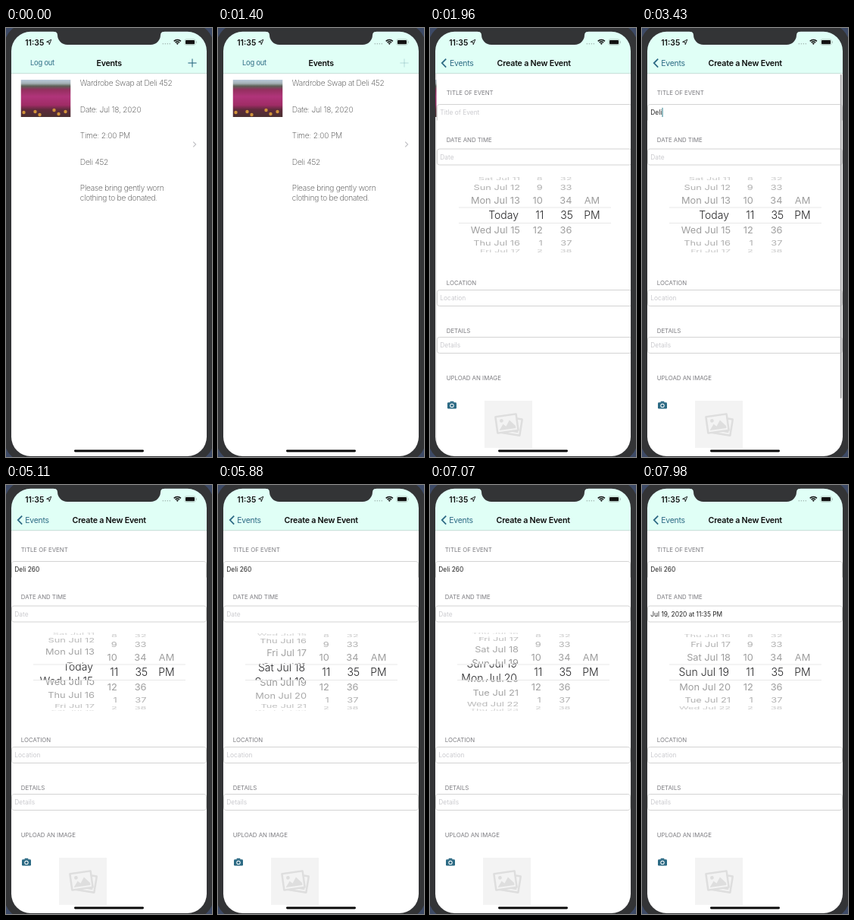
Recreate the animation shown at these times as an HTML page with a canvas. Size 272 by 564 pixels, loop 8 s.

```html
<!DOCTYPE html>
<html lang="en">
<head>
<meta charset="utf-8">
<title>Event planner</title>
<style>
html, body { margin: 0; width: 100%; height: 100%; overflow: hidden; background: #333436; }
canvas { display: block; width: 100vw; height: 100vh; }
</style>
</head>
<body>
<canvas id="stage"></canvas>
<script>
const W = 272, H = 564, LOOP = 8000;
const SCREEN = { x: 7, y: 4.7, w: 258, h: 558.2, r: 25.5 };
const NOTCH = { left: 68, right: 204, bottom: 22, r: 13, flare: 5 };
const MINT = '#e0fff6', TINT = '#2c6a84';
const PUSH_START = 1580;
const TITLE = 'Deli 260';
const KEY_TIMES = [2940, 3150, 3360, 3430, 3570, 3710, 3850, 4200];

const canvas = document.getElementById('stage');
const ctx = canvas.getContext('2d');

const clamp = v => Math.max(0, Math.min(1, v));
const span = (t, a, b) => clamp((t - a) / (b - a));
const linear = u => u;
const easeOut = u => 1 - (1 - u) ** 2;
const easeInOut = u => u * u * (3 - 2 * u);

// Day wheel: time, day of July, easing towards that day
const WHEEL = [
  [5040, 14, linear], [5180, 14.5, easeOut], [5460, 14.5, linear],
  [5880, 18.3, linear], [6440, 20.4, easeOut], [6800, 20.4, linear],
  [7070, 19.59, linear], [7350, 19.2, easeOut], [7500, 19.2, linear],
  [7840, 19, easeInOut]
];

function dayAt(t) {
  let [t0, d0] = WHEEL[0];
  for (const [t1, d1, ease] of WHEEL) {
    if (t < t1) return d0 + (d1 - d0) * ease(span(t, t0, t1));
    [t0, d0] = [t1, d1];
  }
  return d0;
}

// Critically damped spring, 0 to 1
function pushAt(t) {
  const w = 18.26 * Math.max(0, t - PUSH_START) / 1000;
  return 1 - Math.exp(-w) * (1 + w);
}

function group(draw, alpha = 1, dx = 0, dy = 0) {
  ctx.save();
  ctx.globalAlpha *= alpha;
  ctx.translate(dx, dy);
  draw();
  ctx.restore();
}

function rect(x, y, w, h, color) {
  ctx.fillStyle = color;
  ctx.fillRect(x, y, w, h);
}

function rounded(x, y, w, h, r, color) {
  ctx.fillStyle = color;
  ctx.beginPath();
  ctx.roundRect(x, y, w, h, r);
  ctx.fill();
}

function dot(x, y, r, color) {
  ctx.fillStyle = color;
  ctx.beginPath();
  ctx.arc(x, y, r, 0, Math.PI * 2);
  ctx.fill();
}

function path(points, close) {
  ctx.beginPath();
  points.forEach(([x, y]) => ctx.lineTo(x, y));
  if (close) ctx.closePath();
}

function line(points, color, width) {
  path(points);
  ctx.strokeStyle = color;
  ctx.lineWidth = width;
  ctx.stroke();
}

function shape(points, color) {
  path(points, true);
  ctx.fillStyle = color;
  ctx.fill();
}

// y is the middle of the capitals
function text(str, x, y, size, color, { weight = 400, align = 'left', track = 0 } = {}) {
  ctx.font = `${weight} ${size}px Inter, "Liberation Sans", sans-serif`;
  ctx.letterSpacing = `${track * size}px`;
  ctx.textAlign = align;
  ctx.fillStyle = color;
  ctx.fillText(str, x, y + size * 0.364);
}

function photo() {
  ctx.beginPath();
  ctx.rect(0, 0, 66, 49);
  ctx.clip();
  const tones = ctx.createLinearGradient(0, 0, 0, 49);
  [[0, '#b9c9da'], [0.1, '#a3b0b4'], [0.17, '#5d6157'], [0.27, '#94305f'],
    [0.45, '#b0347a'], [0.68, '#a02c66'], [0.8, '#5f2a3c'], [1, '#4a3030']]
    .forEach(([at, color]) => tones.addColorStop(at, color));
  rect(0, 0, 66, 49, tones);
  [[4, 43], [19, 42], [25, 46], [44, 40], [50, 45], [59, 42]]
    .forEach(([x, y]) => dot(x, y, 2.2, '#d0923a'));
}

function eventsPage() {
  rect(7, 60, 258, 504, '#fff');
  group(photo, 1, 19.5, 68);
  const rows = [
    ['Wardrobe Swap at Deli 452', 72.5], ['Date: Jul 18, 2020', 107],
    ['Time: 2:00 PM', 141.5], ['Deli 452', 176],
    ['Please bring gently worn', 210.5], ['clothing to be donated.', 223]
  ];
  rows.forEach(([s, y]) => text(s, 97.8, y, 10.2, '#3c3c3c', { weight: 200, track: -0.02 }));
  line([[247.2, 149.6], [250.6, 153], [247.2, 156.4]], '#c2c2c6', 1.2);
}

function field(y, value, hint, open) {
  const r = 3, x0 = 7.5, x1 = 264.5, y1 = y + 21;
  ctx.strokeStyle = '#cfcfcf';
  ctx.lineWidth = 0.9;
  ctx.beginPath();
  if (open) {
    ctx.moveTo(x0, y1);
    ctx.arcTo(x0, y, x1, y, r);
    ctx.arcTo(x1, y, x1, y1, r);
    ctx.lineTo(x1, y1);
  } else {
    ctx.roundRect(x0, y, x1 - x0, 21, r);
  }
  ctx.stroke();
  text(value || hint, 11.3, y + 10.5, 8.4, value ? '#222' : '#cbcbcf');
}

const DAYS = ['Sun', 'Mon', 'Tue', 'Wed', 'Thu', 'Fri', 'Sat'];
const dayName = d => d === 14 ? 'Today' : `${DAYS[(d + 2) % 7]} Jul ${d}`;
const hourName = h => String((h + 11) % 12 + 1);
const noonName = n => ['AM', 'PM'][n] || '';

const PICK_Y = 246, PICK_R = 51.5, PICK_STEP = Math.PI / 8;

function curvedRow(label, offset, x, align) {
  const angle = offset * PICK_STEP, squash = Math.cos(angle);
  if (squash < 0.05) return;
  ctx.save();
  ctx.translate(x, PICK_Y + PICK_R * Math.sin(angle));
  ctx.scale(1, squash);
  ctx.globalAlpha *= 0.25 + 0.75 * squash;
  text(label, 0, 0, 12.8, '#979797', { align });
  ctx.restore();
}

function flatRow(label, offset, x, align) {
  text(label, x, PICK_Y + offset * 19, 14, '#262628', { weight: 350, align });
}

// Each column: position, label, edge of curved rows, edge of flat rows, alignment
function wheels(day, drawRow, flat) {
  const columns = [
    [day, dayName, 117, 115, 'right'], [11, hourName, 146.8, 148.3, 'right'],
    [35, String, 185.5, 187, 'right'], [1, noonName, 212, 212, 'center']
  ];
  for (const [pos, label, curvedX, flatX, align] of columns) {
    const mid = Math.round(pos);
    for (let i = mid - 4; i <= mid + 4; i++) {
      drawRow(label(i), i - pos, flat ? flatX : curvedX, align);
    }
  }
}

function clipped(bands, draw) {
  group(() => {
    ctx.beginPath();
    bands.forEach(([y0, y1]) => ctx.rect(30, y0, 214, y1 - y0));
    ctx.clip();
    draw();
  });
}

function picker(day) {
  const top = 235, bottom = 257;
  clipped([[194, top], [bottom, 297]], () => wheels(day, curvedRow, false));
  clipped([[top, bottom]], () => wheels(day, flatRow, true));
  [236, 256.5].forEach(y => line([[36, y], [237, y]], '#dedede', 0.7));
}

function camera() {
  rounded(21, 492.2, 12, 8.4, 1.4, TINT);
  shape([[24, 492.6], [25, 490.8], [29, 490.8], [30, 492.6]], TINT);
  dot(27, 496.4, 2.7, '#fff');
  dot(27, 496.4, 1.7, TINT);
}

function frameIcon(angle, dx, dy) {
  ctx.save();
  ctx.translate(101.5 + dx, 521 + dy);
  ctx.rotate(angle);
  rounded(-15, -12, 30, 24, 1.5, '#dedede');
  rect(-12.5, -9.5, 25, 19, '#f3f3f3');
  dot(-6.5, -4.5, 2.4, '#dedede');
  shape([[-11, 7.5], [-5, 0], [-1.5, 3.5], [4, -4], [11, 4.5], [11, 7.5]], '#dedede');
  ctx.restore();
}

function formPage(t) {
  rect(7, 60, 258, 504, '#fff');
  const heads = [['TITLE OF EVENT', 85], ['DATE AND TIME', 147], ['LOCATION', 335.5],
    ['DETAILS', 398], ['UPLOAD AN IMAGE', 460]];
  heads.forEach(([s, y]) => text(s, 19.8, y, 7.8, '#7c7c80'));

  const typed = TITLE.slice(0, KEY_TIMES.filter(k => t >= k).length);
  field(100.5, typed, 'Title of Event', true);
  if (t >= 2450 && t < 4760) {
    ctx.font = '400 8.4px Inter, "Liberation Sans", sans-serif';
    ctx.letterSpacing = '0px';
    rect(11.3 + ctx.measureText(typed).width + 0.2, 104.8, 1.1, 12.2, '#3f8796');
  }
  field(159, t >= 7840 ? 'Jul 19, 2020 at 11:35 PM' : '', 'Date');
  picker(dayAt(t));
  field(344.5, '', 'Location');
  field(406.5, '', 'Details');

  camera();
  rect(70, 490, 63, 62, '#f3f3f3');
  frameIcon(0.16, 3, 2);
  frameIcon(-0.14, -2, -1);

  const bar = span(t, 3340, 3380) * (1 - span(t, 3600, 3880));
  if (bar > 0) group(() => rounded(261.8, 61, 1.9, 426, 1, '#a8a8aa'), bar);
}

function navBar(t, p) {
  rect(7, 0, 258, 60, MINT);
  line([[7, 59.7], [265, 59.7]], '#b9cfc9', 0.7);
  const bold = { weight: 600, align: 'center', track: -0.02 };
  const fade = clamp(1 - p * 1.6), show = clamp(p * 1.6 - 0.6);

  if (fade > 0) {
    group(() => text('Log out', 32, 46, 9.3, TINT, { track: -0.02 }), fade);
    group(() => text('Events', 136.2 - 94.5 * p, 46, 10.6, '#0c0c0c', bold), fade);
    const pressed = t >= 1050 && t < PUSH_START + 200;
    group(() => {
      line([[240.4, 46], [251.6, 46]], TINT, 1.1);
      line([[246, 40.4], [246, 51.6]], TINT, 1.1);
    }, fade * (pressed ? 0.22 : 1));
  }
  if (show > 0) {
    group(() => {
      line([[21.2, 40.6], [15.8, 46.1], [21.2, 51.6]], TINT, 1.8);
      text('Events', 25.2 + 94.5 * (1 - p), 46, 10.4, TINT, { track: -0.02 });
    }, show);
    group(() => text('Create a New Event', 136.2 + 129 * (1 - p), 46, 10.7, '#0c0c0c', bold), show);
  }
}

function statusBar() {
  text('11:35', 25.2, 18.8, 10.4, '#111', { weight: 600 });
  path([[59.8, 15.2], [53.6, 18.3], [56.8, 18.7], [57.2, 21.8]], true);
  ctx.strokeStyle = '#111';
  ctx.lineWidth = 0.9;
  ctx.stroke();
  for (let i = 0; i < 4; i++) dot(207.3 + i * 3, 20.8, 0.75, '#9fb3ae');

  ctx.strokeStyle = '#111';
  ctx.lineWidth = 1.5;
  [3.9, 6.5].forEach(r => {
    ctx.beginPath();
    ctx.arc(226.3, 22, r, -Math.PI * 0.75, -Math.PI * 0.25);
    ctx.stroke();
  });
  shape([[226.3, 22], [224.6, 20.1], [226.3, 19.4], [228, 20.1]], '#111');

  ctx.strokeStyle = '#a6bab4';
  ctx.lineWidth = 0.7;
  ctx.beginPath();
  ctx.roundRect(235.9, 14.9, 14.2, 7.4, 2);
  ctx.stroke();
  rounded(237, 15.9, 12, 5.4, 1.1, '#111');
  rect(250.8, 17.4, 0.9, 2.4, '#a6bab4');
}

function body() {
  const { x, y, w, h, r } = SCREEN;
  ctx.beginPath();
  ctx.rect(0, 0, W, H);
  ctx.roundRect(x, y, w, h, r);
  ctx.fillStyle = '#333436';
  ctx.fill('evenodd');

  const { left, right, bottom, r: curve, flare } = NOTCH;
  const mid = (left + right) / 2;
  ctx.beginPath();
  ctx.moveTo(left - flare, y - 1);
  ctx.lineTo(left - flare, y);
  ctx.quadraticCurveTo(left, y, left, y + flare);
  ctx.arcTo(left, bottom, mid, bottom, curve);
  ctx.arcTo(right, bottom, right, y, curve);
  ctx.lineTo(right, y + flare);
  ctx.quadraticCurveTo(right, y, right + flare, y);
  ctx.lineTo(right + flare, y - 1);
  ctx.fill();

  // Desktop behind the outer corners
  ctx.beginPath();
  ctx.rect(0, 0, W, H);
  ctx.roundRect(-2, -5, W + 4, H + 11, 28);
  ctx.fillStyle = '#3d4a66';
  ctx.fill('evenodd');
}

function draw(t) {
  const p = pushAt(t), width = SCREEN.w;
  if (p < 0.9995) {
    group(eventsPage, 1, -0.3 * width * p);
    rect(7, 60, 258, 504, `rgba(0,0,0,${0.1 * p})`);
  }
  if (p > 0) group(() => formPage(t), 1, width * (1 - p));
  navBar(t, p);
  statusBar();
  rounded(90, 554.6, 92, 2.8, 1.4, '#0a0a0a');
  body();
}

function tick(now) {
  const ratio = window.devicePixelRatio || 1;
  const w = Math.round(W * ratio), h = Math.round(H * ratio);
  if (canvas.width !== w || canvas.height !== h) {
    canvas.width = w;
    canvas.height = h;
  }
  ctx.setTransform(w / W, 0, 0, h / H, 0, 0);
  draw(now % LOOP);
  requestAnimationFrame(tick);
}
tick(performance.now());
</script>
</body>
</html>
```
